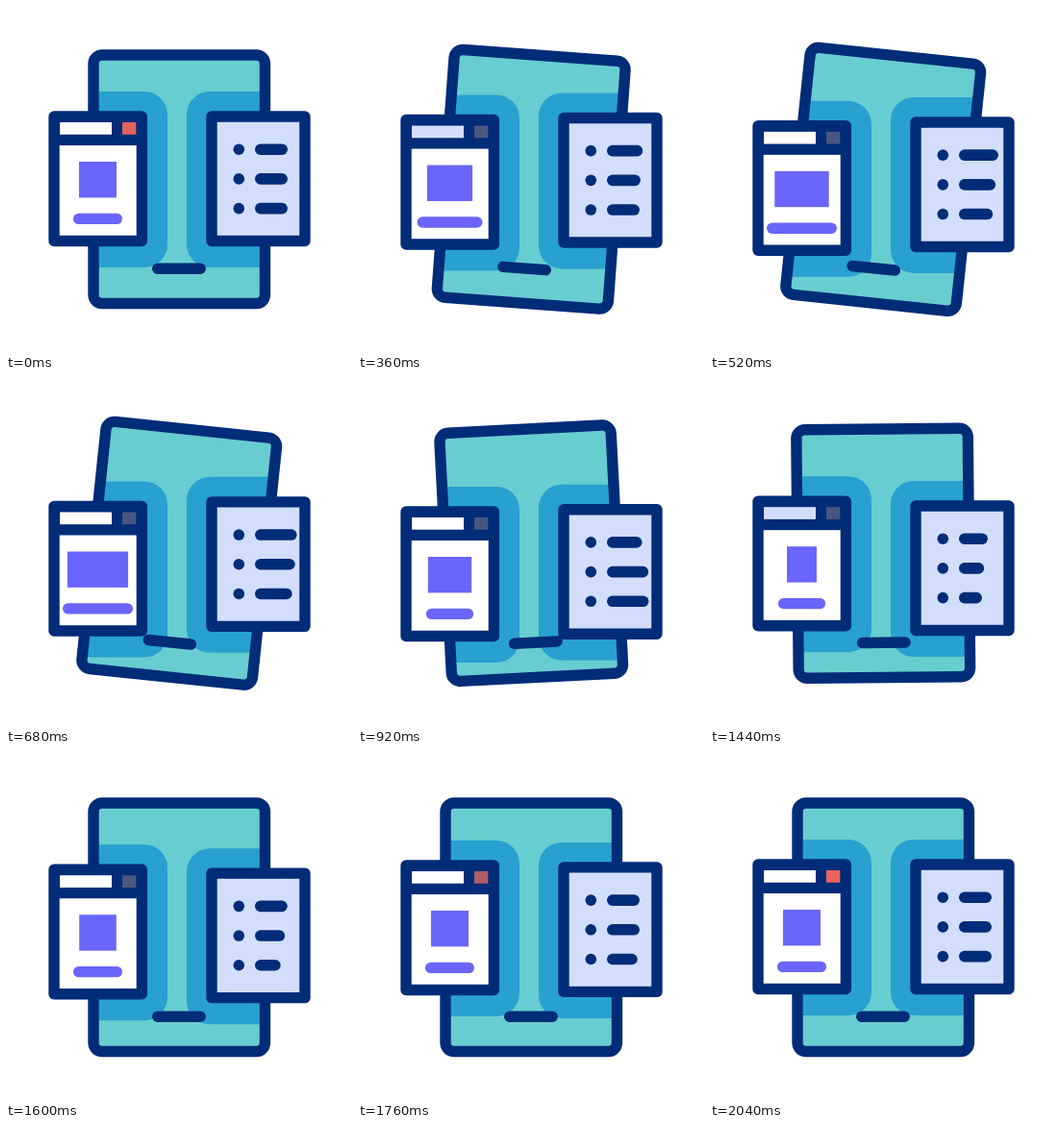
Animation of 360x360 px, one loop 2.08 s. Source, as an HTML page:

```html
<!DOCTYPE html>
<html lang="en">
<head>
<meta charset="utf-8">
<title>Tablet windows</title>
<style>
  html, body { margin: 0; width: 100%; height: 100%; overflow: hidden; background: #fff; }
  svg { display: block; width: 100vw; height: 100vh; }
  .frame { stroke: #002c78; stroke-width: 11.4; stroke-linejoin: round; }
  .navy { fill: #002c78; }
  .blob { fill: #28a1d0; }
  .violet { fill: #6a65fb; }
</style>
</head>
<body>
<svg viewBox="0 0 360 360">
  <defs>
    <clipPath id="screen"><rect class="tilt" x="91" y="51" width="178.5" height="258.5" rx="9"/></clipPath>
  </defs>
  <rect class="tilt" x="91" y="51" width="178.5" height="258.5" rx="9" fill="#68cdd0"/>
  <g clip-path="url(#screen)">
    <rect class="blob left" x="30" y="89" width="138" height="183" rx="24"/>
    <rect class="blob right" x="188" y="89" width="138" height="183" rx="24"/>
  </g>
  <g class="tilt">
    <rect class="frame" x="91" y="51" width="178.5" height="258.5" rx="9" fill="none"/>
    <rect class="navy" x="152" y="267.5" width="56" height="11.5" rx="5.75"/>
  </g>
  <g class="left">
    <rect class="frame" x="50" y="115" width="91.4" height="129.5" fill="#fff"/>
    <rect class="navy" x="50" y="115" width="91.4" height="30"/>
    <rect id="title" x="56" y="121" width="54" height="12.7"/>
    <rect id="button" x="121" y="121" width="14.3" height="12.7"/>
    <rect id="square" class="violet" y="162" height="37.4"/>
    <rect id="caption" class="violet" y="215.7" height="11.4" rx="5.7"/>
  </g>
  <g class="right" id="list">
    <rect class="frame" x="214" y="115" width="97" height="129.5" fill="#d3defe"/>
  </g>
</svg>
<script>
const LOOP = 2080, STEP = 40;
const all = s => document.querySelectorAll(s);
const byId = id => document.getElementById(id);

// Eased value at time t between [time, value] keys.
function track(t, keys) {
  if (t <= keys[0][0]) return keys[0][1];
  for (let i = 1; i < keys.length; i++) {
    const [t0, a] = keys[i - 1], [t1, b] = keys[i];
    if (t <= t1) {
      const p = (t - t0) / (t1 - t0);
      return a + (b - a) * p * p * (3 - 2 * p);
    }
  }
  return keys[keys.length - 1][1];
}

const tilt = [[20, 0], [560, 6.1], [655, 6.1], [1050, -6], [1530, 0]];
const leftDrop = [[165, 0], [930, 22], [1020, 22], [1870, 0]];
const rightDrop = [[225, 0], [1085, 21.8], [1190, 21.8], [1930, 0]];
const stretch = [[120, 0], [750, 1], [1160, -1], [1180, -1], [1640, 0]];
const captionWidth = [[0, 51], [520, 73], [680, 73], [1090, 35], [1530, 51]];
const buttonFade = [[-80, 0], [420, 1], [1560, 1], [1900, 0], [2000, 0], [2500, 1]];
const rowDelay = [0, 120, 260];

function add(parent, tag, attrs) {
  const el = document.createElementNS('http://www.w3.org/2000/svg', tag);
  for (const k in attrs) el.setAttribute(k, attrs[k]);
  return parent.appendChild(el);
}

const rows = rowDelay.map((_, i) => {
  const cy = 149.2 + 30.7 * i;
  add(byId('list'), 'circle', { class: 'navy', cx: 242.3, cy, r: 5.8 });
  return add(byId('list'), 'rect', { class: 'navy', x: 259, y: cy - 5.8, height: 11.6, rx: 5.8 });
});

function move(selector, value) {
  all(selector).forEach(el => el.setAttribute('transform', value));
}

function centre(el, width) {
  el.setAttribute('x', 95.5 - width / 2);
  el.setAttribute('width', width);
}

function mix(a, b, p) {
  return `rgb(${a.map((v, i) => Math.round(v + (b[i] - v) * p))})`;
}

function render(t) {
  move('.tilt', `rotate(${track(t, tilt)} 180 180)`);
  move('.left', `translate(0 ${track(t, leftDrop)})`);
  move('.right', `translate(0 ${track(t, rightDrop)})`);

  const s = track(t, stretch);
  centre(byId('square'), 39 + s * (s > 0 ? 25 : 20));
  centre(byId('caption'), track(t, captionWidth));
  rows.forEach((row, i) => row.setAttribute('width', 34 + 10 * track(t - rowDelay[i], stretch)));

  const tinted = (t >= 320 && t < 480) || (t >= 1240 && t < 1600);
  byId('title').setAttribute('fill', tinted ? '#d3defe' : '#fff');
  byId('button').setAttribute('fill', mix([238, 99, 90], [70, 86, 128], track(t, buttonFade)));
}

const start = performance.now();
function tick() {
  const t = (performance.now() - start) % LOOP;
  render(Math.floor(t / STEP) * STEP);
  requestAnimationFrame(tick);
}
tick();
</script>
</body>
</html>
```
